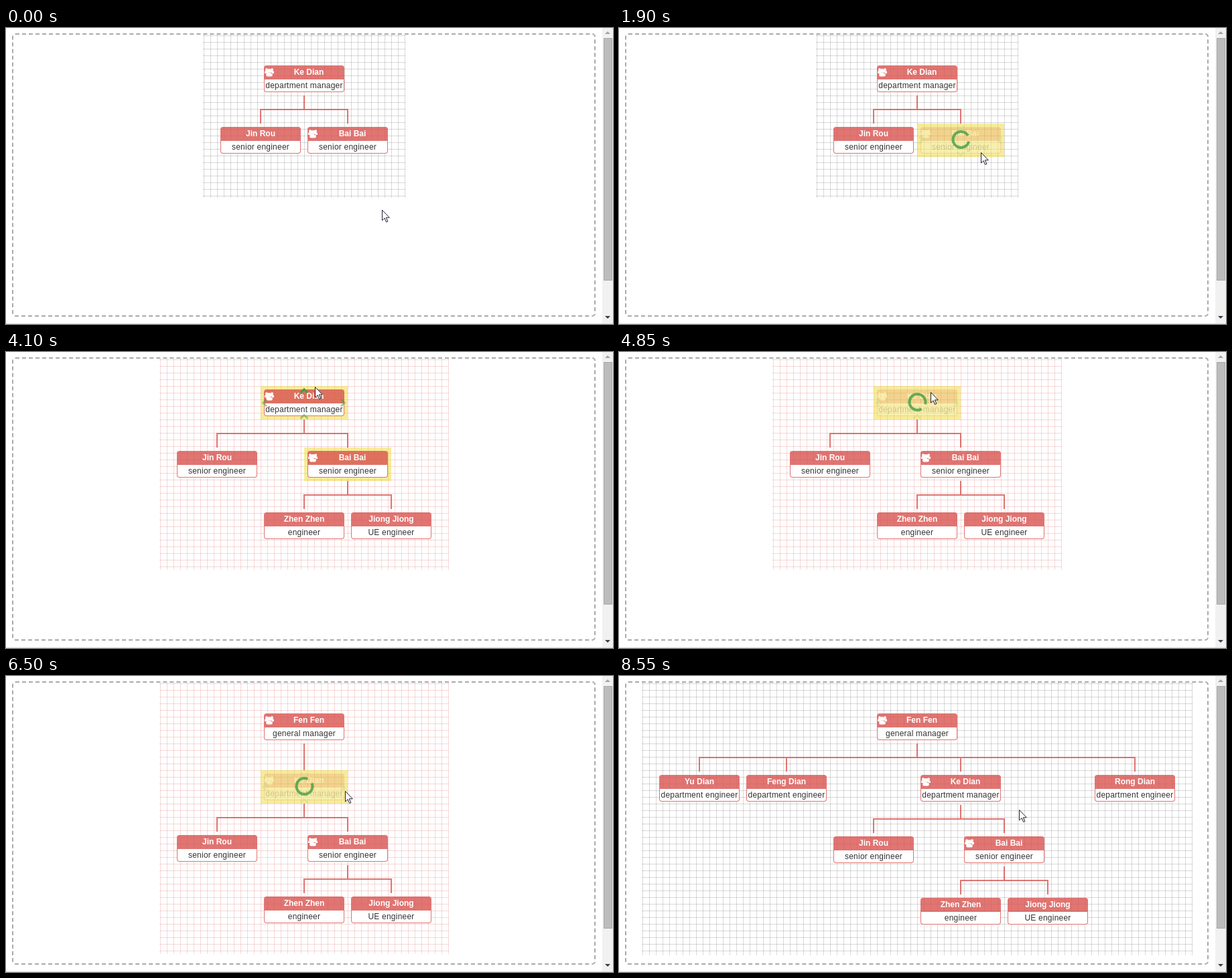
An HTML page for the animation above (8950 ms loop, 906 by 443 pixels).

```html
<!DOCTYPE html>
<html lang="en">
<head>
<meta charset="utf-8">
<title>Org chart</title>
<style>
html, body { margin: 0; width: 100%; height: 100%; overflow: hidden; background: #fff; }
body { position: relative; font: 12px/20px "Liberation Sans", Arial, sans-serif; color: #333; }
div, svg { position: absolute; box-sizing: border-box; }
svg { overflow: visible; }
.frame { left: 9px; top: 8px; width: 871px; height: 424px; border: 2px dashed #aaa; border-radius: 5px; }
.base { left: 0; top: 442px; width: 906px; height: 1px; background: #ddd; }
.track { left: 890px; top: 0; width: 16px; height: 442px; background: #f1f1f1; }
.thumb { left: 2px; top: 15px; width: 13px; height: 363px; background: #bcbcbc; border: 1px solid #a8a8a8; }
.grid { background-size: 10px 10px; background-position: 1px 1px; }
.line { background: rgba(217,83,79,.8); }
.node { width: 130px; height: 50px; }
.body { left: 0; top: 0; width: 130px; height: 50px; }
.title, .role { left: 5px; width: 120px; height: 20px; text-align: center; white-space: nowrap; }
.title { top: 5px; font-weight: bold; color: #fff; background: rgba(217,83,79,.8); border-radius: 4px 4px 0 0; }
.lead { padding-left: 14px; }
.role { top: 25px; line-height: 18px; letter-spacing: .22px; background: #fff;
  border: 1px solid rgba(217,83,79,.8); border-radius: 0 0 4px 4px; }
</style>
</head>
<body>
<div class="frame"></div>
<div class="base"></div>
<div class="track">
  <div class="thumb"></div>
  <svg width="16" height="442"><path d="M4 9l4-4 4 4z" fill="#a3a3a3"/><path d="M4 431h8l-4 4z" fill="#3c3c50"/></svg>
</div>
<div id="stage"></div>
<script>
const LOOP = 8950, STEP = 50;
const stage = document.getElementById('stage');

// name, role, has a team
const people = {
  top: ['Fen Fen', 'general manager', 1],
  lead: ['Ke Dian', 'department manager', 1],
  bo: ['Yu Dian', 'department engineer'],
  hong: ['Feng Dian', 'department engineer'],
  chun: ['Rong Dian', 'department engineer'],
  tie: ['Jin Rou', 'senior engineer'],
  hei: ['Bai Bai', 'senior engineer', 1],
  pang: ['Zhen Zhen', 'engineer'],
  xiang: ['Jiong Jiong', 'UE engineer']
};
const reports = { top: ['bo', 'hong', 'lead', 'chun'], lead: ['tie', 'hei'], hei: ['pang', 'xiang'] };

// grid: left, width, height
const layouts = [
  { from: 0, grid: [294, 302, 244], ink: '0,0,0',
    at: { lead: [385, 56], tie: [320, 148], hei: [450, 148] } },
  { from: 2350, grid: [229, 432, 316], ink: '200,0,0',
    at: { lead: [385, 56], tie: [255, 148], hei: [450, 148], pang: [385, 240], xiang: [515, 240] } },
  { from: 4950, grid: [229, 432, 406], ink: '200,0,0',
    at: { top: [385, 56], lead: [385, 146], tie: [255, 238], hei: [450, 238], pang: [385, 330], xiang: [515, 330] } },
  { from: 7150, grid: [34, 822, 408], ink: '0,0,0',
    at: { top: [385, 56], bo: [60, 148], hong: [190, 148], lead: [450, 148], chun: [710, 148],
      tie: [320, 240], hei: [515, 240], pang: [450, 332], xiang: [580, 332] } }
];

// time, x, y of the pointer
const path = [
  [0, 561, 272], [450, 561, 272], [800, 545, 182], [1300, 508, 187], [1450, 508, 187],
  [1650, 540, 186], [2850, 540, 186], [2900, 536, 173], [3200, 480, 98], [3700, 463, 53],
  [4050, 463, 53], [4100, 461, 52], [4300, 465, 60], [5350, 465, 60], [5500, 475, 100],
  [5800, 507, 173], [6200, 507, 173], [6250, 506, 172], [7550, 506, 172], [8000, 597, 200], [LOOP, 597, 200]
];

const within = (t, a, b) => t >= a && t < b;
const ramp = (t, from, span) => Math.max(0, Math.min(1, (t - from) / span));
const smooth = k => k * k * (3 - 2 * k);
const box = (cls, x, y, w, h, css = '') =>
  `<div class="${cls}" style="left:${x}px;top:${y}px;width:${w}px;height:${h}px;${css}"></div>`;

const teamIcon = `<svg style="left:1px;top:3px" width="14" height="14" fill="#fff">
  <circle cx="3" cy="3.2" r="2"/><circle cx="11" cy="3.2" r="2"/><circle cx="7" cy="4.8" r="2.9"/>
  <path d="M0 9V7q0-2 2-2h3v4zM14 9V7q0-2-2-2H9v4zM2.2 11.5q0-4 3-4h3.6q3 0 3 4 0 2-2 2H4.2q-2 0-2-2z"/></svg>`;

// strength of the yellow highlight
function glow(id, t) {
  if (id === 'hei') return t < 4150 ? ramp(t, 775, 500) : 0;
  if (id === 'lead') return ramp(t, 3150, 500) * (1 - ramp(t, 8300, 250));
  if (id === 'top') return t < 5550 ? ramp(t, 5200, 500) : 0;
  return 0;
}

// chevrons in the order top, right, bottom, left; hot is the one under the pointer
function edges(id, t) {
  if (id === 'hei') return {
    show: ramp(t, 775, 200) * (t < 3000), dirs: t < 2700 ? 'v<v>' : 'v<^>',
    hot: within(t, 1200, 1450) ? 2 : -1
  };
  if (id === 'lead') return {
    show: t < 5200 ? ramp(t, 3150, 200) * (1 - ramp(t, 4950, 150)) : ramp(t, 5650, 150) * (1 - ramp(t, 7600, 200)),
    dirs: t < 4950 ? '^>^<' : t < 7400 ? 'v>^<' : 'v<^>',
    hot: within(t, 3600, 4150) ? 0 : within(t, 5750, 6250) ? 1 : -1
  };
  if (id === 'top') return { show: ramp(t, 5200, 200) * (t < 5550), dirs: '  ^ ', hot: -1 };
  return { show: 0 };
}

function loadStart(id, t) {
  if (id === 'hei' && within(t, 1450, 2350)) return 1450;
  if (id === 'lead' && within(t, 4150, 4950)) return 4150;
  if (id === 'lead' && within(t, 6250, 7150)) return 6250;
}

// offset and opacity of nodes being revealed
function reveal(id, t) {
  if ((id === 'pang' || id === 'xiang') && t < 2700) {
    const k = smooth(ramp(t, 2300, 400));
    return [0, -40 * (1 - k), k];
  }
  if (id === 'top') return [0, 0, ramp(t, 4900, 200)];
  if (['bo', 'hong', 'chun'].includes(id)) {
    const k = smooth(ramp(t, 7250, 150));
    return [(id === 'bo' ? 130 : -130) * (1 - k), 0, .85 * ramp(t, 7100, 150) + .15 * k];
  }
  return [0, 0, 1];
}

function chevrons({ show, dirs, hot }) {
  if (!show) return '';
  const spots = [[65, 7], [123, 25], [65, 45.5], [6, 25]];
  const marks = spots.map(([x, y], i) => dirs[i] === ' ' ? '' :
    `<path d="M-5.2 3L0-2.2 5.2 3" transform="translate(${x} ${y}) rotate(${'^>v<'.indexOf(dirs[i]) * 90})"
      stroke="rgba(68,157,68,${i === hot ? 1 : .5})"/>`);
  return `<svg width="130" height="50" fill="none" stroke-width="3" opacity="${show}">${marks.join('')}</svg>`;
}

function spinner(turn) {
  const size = 2 * Math.PI * 12;
  return `<svg width="130" height="50"><circle r="12" fill="none" stroke="rgba(68,157,68,.8)" stroke-width="4"
    stroke-dasharray="${size * .875} ${size * .125}"
    transform="translate(65.5 24) rotate(${turn * 360 - 67.5})"/></svg>`;
}

function node(id, [x, y], t) {
  const [name, role, team] = people[id];
  const [dx, dy, alpha] = reveal(id, t);
  const start = loadStart(id, t), loading = start !== undefined;
  return `<div class="node" style="left:${x - 5 + dx}px;top:${y - 5 + dy}px;opacity:${alpha};
      background:rgba(238,217,54,${glow(id, t) / 2})">
    <div class="body" style="opacity:${loading ? .2 : 1}">
      <div class="title ${team ? 'lead' : ''}">${team ? teamIcon : ''}${name}</div>
      <div class="role">${role}</div>
      ${chevrons(edges(id, t))}
    </div>${loading ? spinner((t - start) / 2000) : ''}</div>`;
}

function links(at) {
  let out = '';
  for (const id in reports) {
    const kids = reports[id].filter(k => at[k]).map(k => at[k]);
    if (!at[id] || !kids.length) continue;
    const x = at[id][0] + 59, y = at[id][1] + 45;
    if (kids.length === 1) {
      out += box('line', x, y, 2, kids[0][1] - 5 - y);
      continue;
    }
    const xs = kids.map(k => k[0] + 59), left = Math.min(...xs);
    out += box('line', x, y, 2, 20) + box('line', left, y + 20, Math.max(...xs) - left + 2, 2);
    out += xs.map(kx => box('line', kx, y + 22, 2, 20)).join('');
  }
  return out;
}

function pointer(t) {
  const i = path.findIndex(p => p[0] > t), a = path[i - 1], b = path[i];
  const k = ramp(t, a[0], b[0] - a[0]);
  const [x, y] = [1, 2].map(n => Math.round(a[n] + (b[n] - a[n]) * k));
  const hand = within(t, 1200, 1450) || within(t, 3600, 4100) || within(t, 5750, 6250);
  const d = hand
    ? 'M0 1.5a1.5 1.5 0 0 1 3 0V7l6 1.5 1.5 2V15l-2 3v3.5H1V18l-5-6 1-2 3 2z'
    : 'M.5.5V16l3.6-3.4 2.6 5.9 2.2-1-2.6-5.7h5z';
  return `<svg style="left:${x}px;top:${y}px" width="13" height="22"><path d="${d}" fill="#fff" stroke="#223"/></svg>`;
}

function scene(t) {
  const { grid: [x, w, h], ink, at } = layouts.filter(l => l.from <= t).pop();
  const rule = dir => `linear-gradient(${dir}, rgba(${ink},.15) 10%, transparent 10%)`;
  return box('grid', x, 10, w, h, `background-image:${rule('90deg')},${rule('180deg')}`) + links(at) +
    Object.keys(at).map(id => node(id, at[id], t)).join('') + pointer(t);
}

const begin = performance.now();
let shown = -1;
function tick() {
  const t = Math.floor((performance.now() - begin) % LOOP / STEP) * STEP;
  if (t !== shown) stage.innerHTML = scene(shown = t);
  requestAnimationFrame(tick);
}
tick();
</script>
</body>
</html>
```
